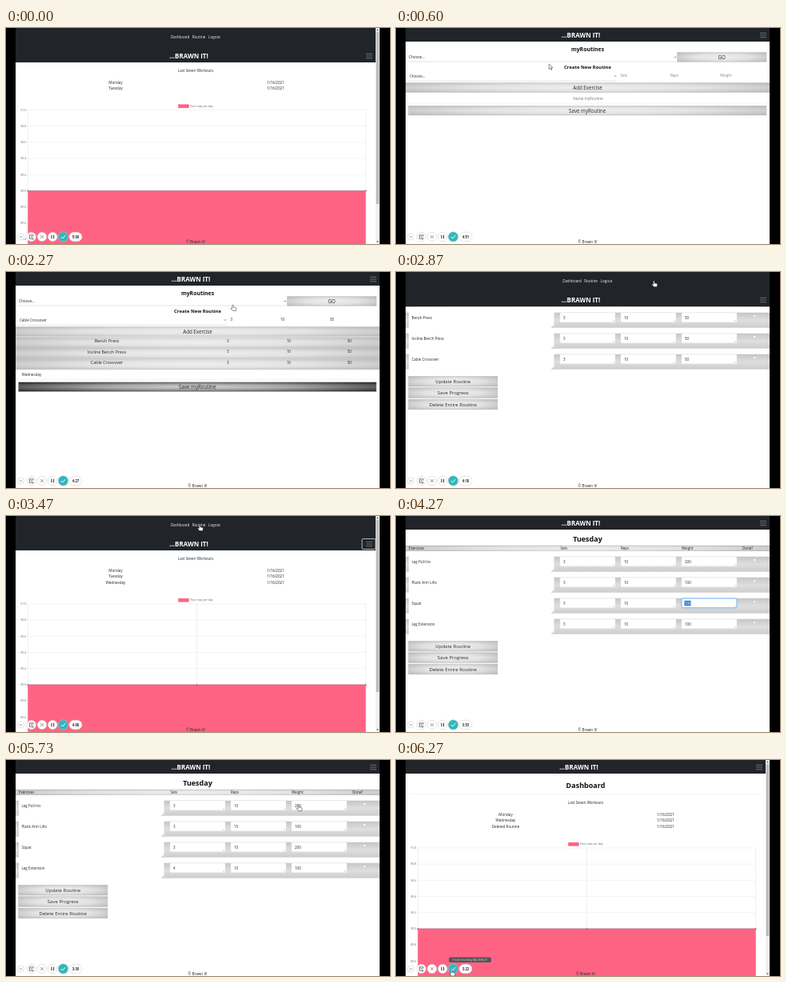
An HTML page for the animation above (6.34 s loop, 480 by 270 pixels).

```html
<!DOCTYPE html>
<html lang="en">
<head>
<meta charset="utf-8">
<title>Workout tracker demo</title>
<style>
html, body { margin: 0; width: 100%; height: 100%; overflow: hidden; background: #000; }
svg { display: block; width: 480px; height: 270px; font-family: "Open Sans", "Noto Sans", sans-serif; }
</style>
</head>
<body>
<svg viewBox="0 0 480 270">
  <defs>
    <radialGradient id="silver" r=".72">
      <stop offset="0" stop-color="#efefef"/><stop offset=".45" stop-color="#e2e2e2"/><stop offset="1" stop-color="#b4b4b4"/>
    </radialGradient>
    <radialGradient id="steel" r=".72">
      <stop offset="0" stop-color="#d2d2d2"/><stop offset=".4" stop-color="#a2a2a2"/><stop offset="1" stop-color="#161616"/>
    </radialGradient>
    <linearGradient id="band" x2="0" y2="1">
      <stop offset="0" stop-color="#c6c6c6"/><stop offset=".5" stop-color="#dedede"/><stop offset="1" stop-color="#cdcdcd"/>
    </linearGradient>
    <clipPath id="page"><rect x="12" width="455" height="270"/></clipPath>
  </defs>
  <g id="stage"></g>
</svg>
<script>
const LOOP = 6340, TICK = 200 / 3;
const BRAND = '...BRAWN IT!', FOOTER = '© Brawn It!';
const PINK = '#ff6384', DARK = '#212529';
const MOVES = ['Bench Press', 'Incline Bench Press', 'Cable Crossover'];
const LEGS = ['Leg Pull-Ins', 'Plank Arm Lifts', 'Squat', 'Leg Extension'];
const FIELDS = [205, 281, 357];

// Each entry changes part of the state from its time on.
const script = [
  [0, { page: 'dash', menu: 1, days: ['Monday', 'Tuesday'], rows: 0, pick: 'Choose...', move: 'Choose...', name: '' }],
  [400, { page: 'routines', menu: 0 }],
  [930, { move: MOVES[0], sets: 1 }],
  [1200, { rows: 1, focus: 'Add Exercise' }],
  [1530, { move: MOVES[1] }],
  [1660, { rows: 2 }],
  [1800, { move: MOVES[2] }],
  [1930, { rows: 3 }],
  [2000, { focus: '' }],
  [2200, { press: 'Save myRoutine' }],
  [2330, { press: '', pick: 'Wednesday' }],
  [2460, { press: 'GO' }],
  [2530, { page: 'Wednesday', press: '' }],
  [2660, { press: 'Save Progress' }],
  [2730, { press: '' }],
  [2800, { menu: 1 }],
  [2930, { page: 'dash', menu: 0, days: ['Monday', 'Tuesday', 'Wednesday'] }],
  [3270, { menu: 1, ring: 1 }],
  [3530, { page: 'routines', menu: 0, ring: 0, rows: 0, pick: 'Choose...', move: 'Choose...', sets: 0 }],
  [3730, { pick: 'Tuesday' }],
  [3870, { page: 'Tuesday' }],
  [5000, { press: 'Update Routine' }],
  [5070, { press: '' }],
  [5470, { menu: 1 }],
  [5600, { page: 'routines', menu: 0, pick: 'Choose...' }],
  [5670, { pick: 'Tuesday' }],
  [5730, { page: 'Tuesday' }],
  [5870, { press: 'Delete Entire Routine' }],
  [5930, { page: 'dash', press: '', days: ['Monday', 'Wednesday', 'Deleted Routine'] }],
  [6260, { tip: 1 }]
];

// row, column, new value, selected at, typed at
const edits = [[0, 2, 200, 4000, 4130], [2, 2, 200, 4200, 4400], [1, 1, 15, 4530, 4600], [3, 0, 4, 4730, 4800]];

// time, x, y, shape: 0 hidden, 1 arrow, 2 hand
const path = [
  [0, 262, 60, 0], [130, 262, 50, 1], [270, 241, 11, 2], [400, 235, 30, 1], [800, 150, 59, 1],
  [1000, 290, 59, 1], [1200, 240, 74, 2], [1330, 240, 53.5, 2], [1530, 150, 59, 1], [1660, 240, 74, 2],
  [1800, 150, 59, 1], [1930, 240, 74, 2], [2000, 200, 127, 0], [2200, 260, 90, 2], [2270, 283.5, 41, 2],
  [2460, 406, 37, 2], [2660, 72, 178, 2], [2800, 458, 11, 2], [2930, 218, 11, 2], [3070, 300, 90, 1],
  [3270, 453, 35, 2], [3470, 242, 11, 2], [3670, 240, 37, 2], [3860, 406, 37, 2], [4000, 390, 57, 0],
  [4930, 90, 163, 2], [5070, 90, 163, 2], [5260, 458, 11, 2], [5470, 458, 11, 2], [5600, 241, 11, 2],
  [5700, 406, 37, 2], [5870, 80, 192, 2], [6000, 202, 150, 1], [6130, 202, 175, 1], [6260, 69.5, 262.5, 2]
];
const clock = [[0, 300.5], [1330, 280.5], [2270, 267.5], [3470, 248.5], [4270, 233.5], [5270, 217.5], [6270, 202.5]];

const rect = (x, y, w, h, fill, more = '') => `<rect x="${x}" y="${y}" width="${w}" height="${h}" fill="${fill}" ${more}/>`;
const line = (x1, y1, x2, y2, color = '#e3e3e3', w = .5) =>
  `<path d="M${x1} ${y1}L${x2} ${y2}" stroke="${color}" stroke-width="${w}" fill="none"/>`;
const text = (x, y, s, size = 4.7, more = '') =>
  `<text x="${x}" y="${y + size * .36}" font-size="${size}" fill="#212529" ${more}>${s}</text>`;
const mid = (x, y, s, size, more = '') => text(x, y, s, size, 'text-anchor="middle" ' + more);
const bold = (x, y, s, size, fill = '#111') => mid(x, y, s, size, `font-weight="700" style="fill:${fill}"`);
const caret = (x, y) => `<path d="M${x - 1.2} ${y - .6}l1.2 1.2 1.2-1.2" stroke="#333" stroke-width=".6" fill="none"/>`;

function segment(points, t) {
  let i = points.length - 1;
  while (i && points[i][0] > t) i--;
  const a = points[i], b = points[i + 1] || a;
  return [a, b, b === a ? 0 : (t - a[0]) / (b[0] - a[0])];
}

function stateAt(t) {
  return Object.assign({ t }, ...script.filter(e => e[0] <= t + 4).map(e => e[1]));
}

function button(s, label, x, y, w, h, size = 6.2) {
  const ring = s.focus === label ? 'stroke="#9dc3ee" stroke-width="1"' : 'stroke="#bbb" stroke-width=".4"';
  return rect(x, y, w, h, `url(#${s.press === label ? 'steel' : 'silver'})`, ring) + mid(x + w / 2, y + h / 2 + .2, label, size);
}

function nav(s, right) {
  const drop = s.menu ? 26 : 0, cx = (12 + right) / 2, bx = right - 8;
  let out = rect(12, 0, right - 12, 17 + drop, DARK);
  if (s.menu) {
    ['Dashboard', 'Routine', 'Logout'].forEach((l, i) => {
      out += mid(cx + [-19.5, 4, 23.5][i], 11, l, 4.6, 'style="fill:#f4f4f4"');
    });
  }
  out += bold(cx - 8.5, 9 + drop, BRAND, 8, '#fff');
  if (s.ring) out += rect(445, 28.5, 17, 13, 'none', 'rx="1.5" stroke="#c8cbce" stroke-width=".9"');
  for (const dy of [-2.7, 0, 2.7]) out += line(bx - 4, 9 + drop + dy, bx + 4, 9 + drop + dy, '#8b8f93', .7);
  return out;
}

function dashboard(s) {
  const n = s.days.length, top = 102.5 + 7.4 * (n - 2), base = top + 101;
  let out = bold(237, 32, 'Dashboard', 9) + line(16, 42.3, 458, 42.3, '#ececec');
  out += mid(237, 53.5, 'Last Seven Workouts', 4.6);
  s.days.forEach((d, i) => {
    out += mid(137, 68.3 + 7.3 * i, d, 4.6) + mid(337, 68.3 + 7.3 * i, '1/16/2021', 4.6);
  });
  out += rect(215.5, top - 6.8, 13, 4.2, PINK, 'stroke="#e8688a" stroke-width=".4"');
  out += text(230, top - 4.7, 'Your reps per day', 3.5, 'style="fill:#666"');
  for (let i = 0; i < 9; i++) {
    const y = top + 20.2 * i;
    out += line(24, y, 450, y, '#e6e6e6') + text(25, y, (91 - i * .2).toFixed(1), 3.4, 'text-anchor="end" style="fill:#666"');
  }
  const xs = s.days.map((_, i) => 27.3 + 422.4 * i / (n - 1));
  xs.forEach(x => { out += line(x, top, x, 270, '#dedede'); });
  out += rect(27.3, base, 422.4, 270 - base, PINK) + line(27.3, base, 449.7, base, '#b96c83', .7);
  xs.forEach(x => { out += `<circle cx="${x}" cy="${base}" r="1" fill="#a37482"/>`; });
  out += mid(237, 267, FOOTER, 4.6);
  out += rect(462, 0, 5, 270, '#f1f1f1') + rect(462.7, 5, 3.6, 215, '#bcbcbc');
  out += '<path d="M463 3.2l1.5-1.6 1.5 1.6zM463 266.6l1.5 1.6 1.5-1.6z" fill="#555"/>';
  return out + nav(s, 462);
}

function routines(s) {
  let out = bold(239.5, 26.5, 'myRoutines', 6.9);
  out += text(16, 36.7, s.pick, 4.6) + caret(349, 36.5) + line(15, 42, 350.5, 42, '#c9c9c9');
  out += button(s, 'GO', 351.5, 30.5, 111.5, 11.8);
  out += bold(239.5, 49.3, 'Create New Routine', 5.9);
  out += text(17, 60, s.move, 4.5) + caret(274, 60) + line(15, 66.3, 276.5, 66.3, '#c9c9c9');
  ['Sets', 'Reps', 'Weight'].forEach((hint, i) => {
    out += text([280.5, 343, 405][i], 59.5, s.sets ? [3, 10, 50][i] : hint, 4.5, s.sets ? '' : 'style="fill:#888"');
  });
  out += button(s, 'Add Exercise', 12, 68.5, 455, 12);
  for (let i = 0; i < s.rows; i++) {
    const y = 86.4 + 13.5 * i;
    out += rect(12, y - 5, 455, 13.5, 'url(#silver)') + line(12, y + 8.3, 467, y + 8.3, '#c6c6c6');
    out += mid(126, y, MOVES[i], 5.4);
    [3, 10, 50].forEach((v, j) => { out += mid(277.3 + 76 * j, y - .4, v, 4.6); });
  }
  const down = 13.5 * s.rows;
  const typing = s.rows === 3 ? 'Wednesday'.slice(0, Math.max(0, Math.floor((s.t - 1990) / 20))) : '';
  out += typing ? text(19.5, 88 + down, typing, 4.6) : mid(240, 88 + down, 'Name myRoutine', 4.6, 'style="fill:#777"');
  out += line(15, 94 + down, 463, 94 + down, '#e8e8e8');
  out += button(s, 'Save myRoutine', 15.5, 97.2 + down, 447.5, 11.8);
  return out + mid(239.5, 267, FOOTER, 4.6) + nav(s, 467);
}

function routine(s) {
  const legs = s.page === 'Tuesday', list = legs ? LEGS : MOVES;
  let out = bold(239.5, 28.3, s.page, 9);
  out += rect(12, 37, 455, 7, 'url(#silver)') + line(12, 37, 467, 37, '#bbb');
  ['Exercises', 'Sets', 'Reps', 'Weight', 'Done?'].forEach((h, i) => {
    out += text([16, 205.5, 281, 357, 433][i], 40.5, h, 4.5);
  });
  list.forEach((name, r) => {
    const y = 57 + 26 * r;
    out += rect(12, y - 6.3, 455, 19, 'url(#band)');
    out += rect(16, y - 7, 181.5, 20, '#fff') + text(19.5, y + .2, name, 4.5);
    out += `<path d="M197.5 ${y + 9}v4h-4z" fill="#d4d4d4"/>`;
    [3, 10, legs ? 100 : 50].forEach((start, c) => {
      const x = FIELDS[c], e = legs && edits.find(d => d[0] === r && d[1] === c);
      const value = e && s.t + 4 >= e[4] ? e[2] : start;
      const active = e && s.t + 4 >= e[3] && s.t + 4 < e[4];
      out += rect(x, y - 6, 69, 11.8, '#fff', `rx="1" stroke="${active ? '#6fb1f7' : '#e2e2e2'}" stroke-width="${active ? 1 : .4}"`);
      out += `<path d="M${x + 66} ${y + 5}l2-2" stroke="#888" stroke-width=".4"/>`;
      if (active) out += rect(x + 3.5, y - 3.2, String(value).length * 2.7, 6.4, '#2f78d7');
      out += text(x + 4, y + .1, value, 4.5, active ? 'style="fill:#fff"' : '');
    });
    out += rect(446.8, y - 3.3, 2.8, 2.8, '#fff', 'rx=".5" stroke="#aaa" stroke-width=".3"');
  });
  ['Update Routine', 'Save Progress', 'Delete Entire Routine'].forEach((l, i) => {
    out += button(s, l, 15.5, 52.3 + 26 * list.length + 14.4 * i, 111.5, 12.8, 6);
  });
  return out + mid(239.5, 267, FOOTER, 4.6) + nav(s, 467);
}

function recorder(s) {
  const [a, b, p] = segment(clock, s.t);
  const left = Math.floor(a[1] + (b[1] - a[1]) * p);
  const disc = (x, r, fill = '#fff') => `<circle cx="${x}" cy="261" r="${r}" fill="${fill}" stroke="#c9c9c9" stroke-width=".5"/>`;
  const icon = (d, color = '#555', w = .8) => `<path d="${d}" stroke="${color}" stroke-width="${w}" fill="none"/>`;
  let out = disc(18.5, 4) + icon('M16.8 261h3.4', '#888');
  out += disc(31.7, 5.8) + icon('M29.3 258.8h4.8M34.1 258.8v1.8M29.3 258.8v4.6h2M30.5 261h2.5M32.5 263.4h2.2M33.2 262l-1.2 1.4 1.2 1.4');
  out += disc(45, 5.8) + icon('M43 259l4 4m0-4l-4 4', '#888');
  out += disc(58.3, 5.8) + icon('M57 258.7v4.6m2.6-4.6v4.6', '#444', 1.1);
  out += disc(71.5, 6.2, '#32b8bd') + icon('M69 261.2l1.8 1.8 3.4-3.8', '#fff', 1);
  out += rect(79, 255.2, 16, 11.6, '#fff', 'rx="5.8" stroke="#c9c9c9" stroke-width=".5"');
  out += bold(87, 261, Math.floor(left / 60) + ':' + String(left % 60).padStart(2, '0'), 4.3, '#333');
  if (s.tip) {
    out += rect(66, 246.5, 53, 6.5, '#555', 'rx="2.5"');
    out += mid(92.5, 249.7, 'Finish recording (Alt+Shift+F)', 3.2, 'style="fill:#ddd"');
  }
  return out;
}

function cursor(t) {
  const [a, b, p] = segment(path, t + 4);
  if (!a[3]) return '';
  const ease = p * p * (3 - 2 * p);
  const at = i => a[i] + (b[i] - a[i]) * ease;
  const shape = a[3] === 1
    ? 'M0 0v6.6l1.6-1.5 1.1 2.4 1-.4-1.1-2.4h2.2z'
    : 'M-.7 .6q.7-1.2 1.4 0v2.2l3 .7q.8.3.7 1.2l-.6 2.8h-3.9l-2.3-2.8q0-1 1-.6l.7.6z';
  return `<path d="${shape}" transform="translate(${at(1)} ${at(2)})" fill="#fff" stroke="#222" stroke-width=".5"/>`;
}

const stage = document.getElementById('stage');
const pages = { dash: dashboard, routines };

function draw(t) {
  const s = stateAt(t);
  const body = (pages[s.page] || routine)(s);
  stage.innerHTML = rect(0, 0, 480, 270, '#000') +
    `<g clip-path="url(#page)">${rect(12, 0, 455, 270, '#fff')}${body}${recorder(s)}${cursor(t)}</g>`;
}

const begin = performance.now();
let last = -1;
function tick() {
  const t = (performance.now() - begin) % LOOP;
  const step = t < 130 ? 0 : Math.floor((t + 4) / TICK);
  if (step !== last) draw((last = step) * TICK);
  requestAnimationFrame(tick);
}
tick();
</script>
</body>
</html>
```
